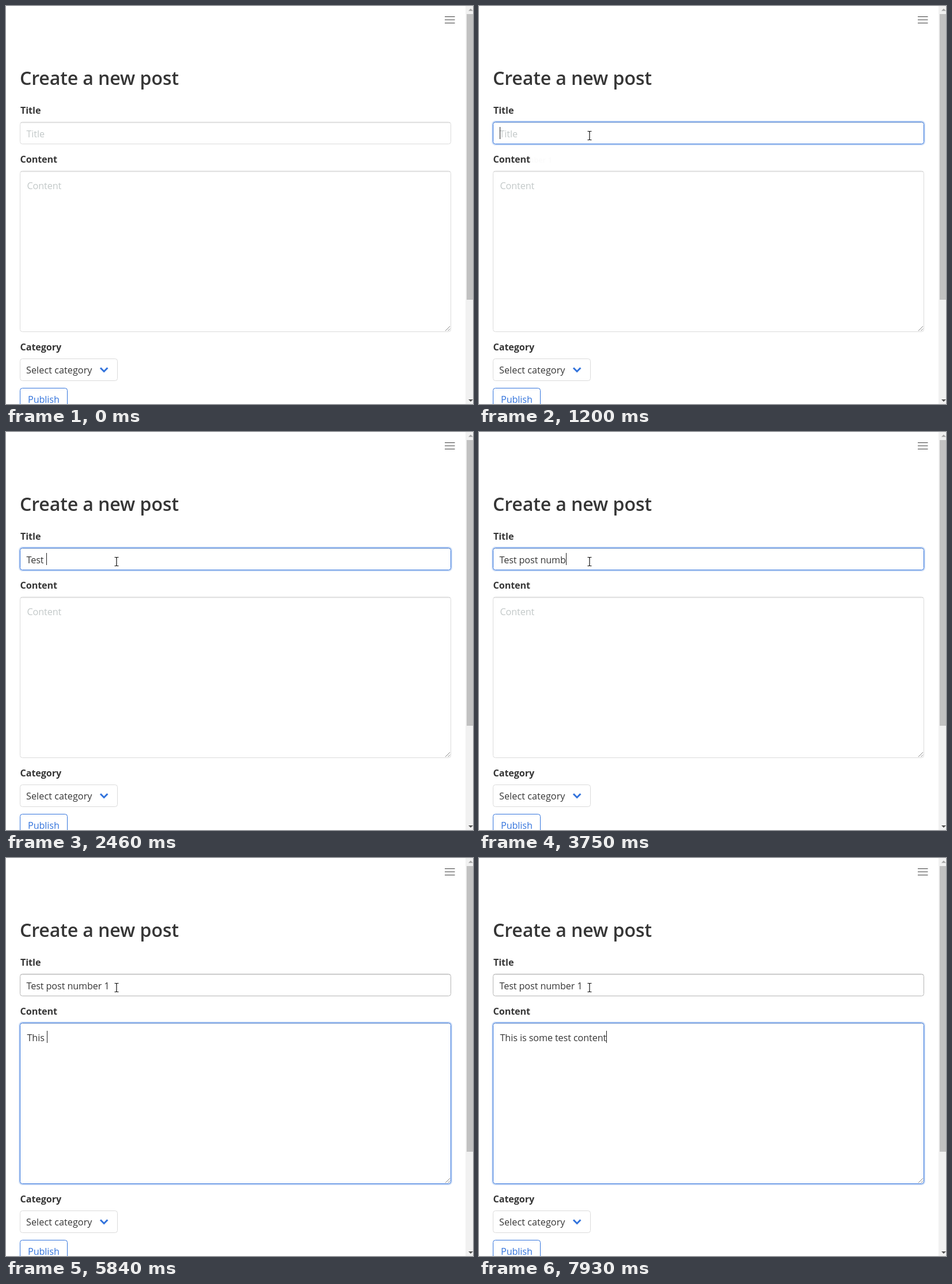
Animation of 811x691 px, one loop 8000 ms. Source, as an HTML page:

```html
<!DOCTYPE html>
<html lang="en">
<head>
<meta charset="utf-8">
<title>Create a new post</title>
<style>
  html, body { margin: 0; width: 100%; height: 100%; overflow: hidden; background: #fff; }
  svg { display: block; width: 100%; height: 100%; }
  text { font: 16.2px "Open Sans", "Noto Sans", sans-serif; letter-spacing: -.1px; fill: #363636; white-space: pre; }
  .label { font-weight: 700; }
  .heading { font-size: 32.2px; font-weight: 600; letter-spacing: -.15px; }
  .hint { font-size: 12.8px; font-weight: 600; letter-spacing: 0; fill: #222; }
  .empty { fill: #c2c8c8; }
  .box { fill: #fff; stroke: #dbdbdb; }
  .ring { fill: none; stroke: #3273dc; stroke-opacity: .25; stroke-width: 2; }
  .caret { fill: #222; }
</style>
</head>
<body>
<svg viewBox="0 0 811 691" xmlns="http://www.w3.org/2000/svg">
  <defs>
    <filter id="drop" x="-10%" y="-20%" width="120%" height="150%">
      <feDropShadow dx="0" dy="1" stdDeviation="1.3" flood-color="#000" flood-opacity=".38"/>
    </filter>
  </defs>
  <rect width="811" height="691" fill="#fff"/>

  <g fill="#4a4a4a">
    <rect x="762" y="18" width="17.5" height="1.1"/>
    <rect x="762" y="23.4" width="17.5" height="1.1"/>
    <rect x="762" y="29" width="17.5" height="1.1"/>
  </g>

  <text class="heading" x="24" y="136.5">Create a new post</text>
  <text class="label" x="25" y="187">Title</text>
  <text class="label" x="24.5" y="272">Content</text>
  <text class="label" x="24.5" y="598">Category</text>

  <g id="fields"></g>
  <path d="M763 564l8-8M767.5 564l3.5-3.5" stroke="#858585" fill="none"/>

  <rect class="box" x="24.5" y="612.5" width="169" height="38" rx="4"/>
  <text x="35" y="638" style="letter-spacing:.06px">Select category</text>
  <path d="M164 628.3l6.2 6.2 6.2-6.2" fill="none" stroke="#3273dc" stroke-width="3"/>

  <rect class="box" x="24.5" y="663.5" width="82" height="40" rx="4" style="stroke:#3273dc"/>
  <text x="38" y="689" style="fill:#3273dc">Publish</text>

  <g id="suggest">
    <rect x="24" y="240" width="140.5" height="55.5" rx="3" fill="#fff" filter="url(#drop)"/>
    <text class="hint" x="36.5" y="272">Post number 1</text>
  </g>

  <rect x="798" width="13" height="691" fill="#f1f1f1"/>
  <rect x="800" y="14" width="11" height="496" fill="#c1c1c1"/>
  <path d="M803 8.5l4-4 4 4z" fill="#a3a3a3"/>
  <path d="M803 683l4 4 4-4z" fill="#505050"/>

  <path id="arrow" d="M.5.5v13.6l3.1-2.9 2.4 4.7 2-1-2.3-4.6h4.2z" fill="#fff" stroke="#111" stroke-linejoin="round"/>
  <path id="beam" d="M-3.5-7.5h2.5l1 1 1-1h2.5M0-6.5v13M-3.5 7.5h2.5l1-1 1 1h2.5" fill="none" stroke="#111" stroke-width="1.2"/>
</svg>
<script>
const LOOP = 8000;
const FOCUS = 1200, TAB = 4640, FIRST_KEY = 1670;
const $ = id => document.getElementById(id);

function add(parent, tag, attrs) {
  const el = document.createElementNS("http://www.w3.org/2000/svg", tag);
  for (const k in attrs) el.setAttribute(k, attrs[k]);
  return parent.appendChild(el);
}

// Each burst is [start, end, keystrokes], evenly spaced.
const spread = bursts => bursts.flatMap(([a, b, n]) =>
  Array.from({ length: n }, (_, i) => n > 1 ? a + (b - a) * i / (n - 1) : a));

function makeField(o) {
  const g = $("fields");
  const frame = (cls, grow) => add(g, "rect", {
    class: cls, x: 24.5 - grow, y: o.top - grow, rx: 4 + grow,
    width: 748 + 2 * grow, height: o.height + 2 * grow
  });
  o.ring = frame("ring", 1.5);
  o.box = frame("box", 0);
  add(g, "path", { d: `M26 ${o.top + 1}H771`, stroke: "#0a0a0a", "stroke-opacity": .1 });
  add(g, "path", { d: `M26 ${o.top + 2}H771`, stroke: "#0a0a0a", "stroke-opacity": .03 });
  o.label = add(g, "text", { x: o.x, y: o.base, "xml:space": "preserve" });
  o.caret = add(g, "rect", { class: "caret", y: o.base - 18, width: 1, height: 21 });
  return o;
}

const title = makeField({
  top: 201.5, height: 38, x: 35.5, base: 228,
  hint: "Title", value: "Test post number 1", from: FOCUS, to: TAB,
  keys: spread([[FIRST_KEY, 0, 1], [2000, 0, 1], [2180, 2310, 2], [2460, 0, 1], [2640, 2970, 5],
    [3160, 0, 1], [3340, 0, 1], [3520, 0, 1], [3750, 3980, 4], [4130, 0, 1]])
});
const content = makeField({
  top: 286.5, height: 279, x: 36.5, base: 318,
  hint: "Content", value: "This is some test content", from: TAB, to: LOOP,
  keys: spread([[5150, 0, 1], [5380, 0, 1], [5560, 5690, 2], [5840, 0, 1], [6020, 6630, 8],
    [6810, 7600, 9], [7730, 7730, 2], [7930, 0, 1]])
});

// Pointer path: [time, x, y]
const path = [[170, 255, 616], [300, 236, 450], [500, 236, 450],
  [740, 215, 244], [770, 215, 244], [1050, 192, 225]];

function pointerAt(t) {
  if (t < path[0][0]) return null;
  const i = path.findIndex(p => p[0] > t);
  if (i < 0) return path[path.length - 1].slice(1);
  const [t0, x0, y0] = path[i - 1], [t1, x1, y1] = path[i];
  const u = (t - t0) / (t1 - t0);
  return [x0 + (x1 - x0) * u, y0 + (y1 - y0) * u];
}

const show = (el, on) => el.setAttribute("visibility", on ? "visible" : "hidden");

function drawField(f, t, pointer) {
  const focused = t >= f.from && t < f.to;
  const hover = !!pointer && pointer[1] >= f.top && pointer[1] <= f.top + f.height;
  const typed = f.value.slice(0, f.keys.filter(k => k <= t).length);
  f.box.style.stroke = focused ? "#3273dc" : hover ? "#b5b5b5" : "#dbdbdb";
  show(f.ring, focused);
  f.label.textContent = typed || f.hint;
  f.label.setAttribute("class", typed ? "" : "empty");
  show(f.caret, focused);
  const end = typed ? f.label.getComputedTextLength() : 0;
  f.caret.setAttribute("x", Math.round(f.x + end));
  return hover;
}

function render(t) {
  const pointer = pointerAt(t);
  const overTitle = drawField(title, t, pointer);
  const overContent = drawField(content, t, pointer);
  const overText = overTitle || overContent;

  const open = t >= FOCUS && t < FIRST_KEY;
  show($("suggest"), open);
  $("suggest").setAttribute("opacity", Math.min(1, Math.max(0, (t - FOCUS) / 85)));

  show($("arrow"), pointer && !overText);
  show($("beam"), pointer && overText);
  if (pointer) {
    const move = `translate(${pointer.map(Math.round)})`;
    $("arrow").setAttribute("transform", move);
    $("beam").setAttribute("transform", move);
  }
}

const start = performance.now();
function tick() {
  render((performance.now() - start) % LOOP);
  requestAnimationFrame(tick);
}
tick();
</script>
</body>
</html>
```
